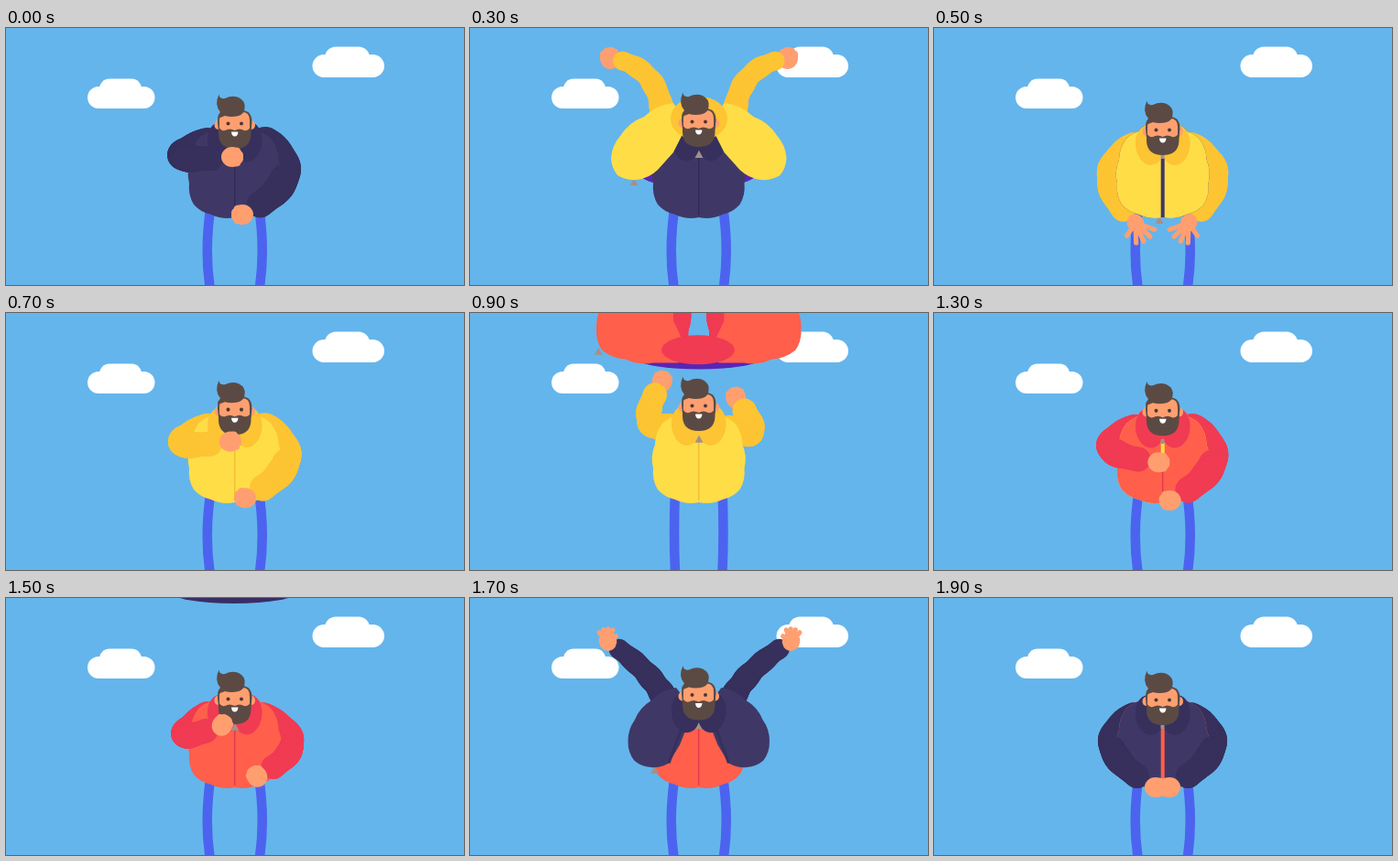
These frames come from a looping animation (500 px wide and 281 px high, 2000 ms). An HTML page with a canvas:

```html
<!DOCTYPE html>
<html lang="en">
<head>
<meta charset="utf-8">
<title>Jackets</title>
<style>
html, body { margin: 0; width: 100%; height: 100%; overflow: hidden; background: #64b5ec; }
canvas { display: block; width: 100vw; height: 100vh; }
</style>
</head>
<body>
<canvas id="stage" width="500" height="281"></canvas>
<script>
const ctx = document.getElementById('stage').getContext('2d');
const LOOP = 2000, STEP = 100, CHANGE = LOOP / 3;
const SKIN = '#ff9f70', HAIR = '#5b4a43', GREY = '#a58f8b';
const JACKETS = [
  { body: '#3f3866', sleeve: '#37305c', line: '#312b54', lining: '#3a2d66' },
  { body: '#ffdd47', sleeve: '#fdc433', line: '#f2bd34', lining: '#5a25b4' },
  { body: '#ff5f4b', sleeve: '#f03b53', line: '#e23a4c', lining: '#5a25b4' }
];

// Each row: time within one jacket change, then values.
const HEAD = [[0, -7], [167, -1], [233, -10], [300, -9], [433, -2], [500, 0], [567, 0], [667, -7]];
const BOW = [[0, 1], [167, 1], [233, .25], [300, 1], [667, 1]];
// shoulder, elbow, hand, shoulder radius, cuff radius
const ARM_L = [
  [0, 220, 126, 193, 141, 247, 141, 17, 13],
  [167, 220, 128, 195, 150, 236, 139, 15, 13],
  [233, 218, 124, 195, 116, 210, 75, 14, 13],
  [300, 210, 94, 193, 52, 153, 33, 13, 10],
  [433, 214, 124, 184, 104, 148, 61, 15, 11],
  [467, 214, 128, 166, 116, 114, 106, 15, 11],
  [500, 219, 130, 192, 165, 220, 213, 16, 13],
  [567, 219, 130, 195, 165, 242, 207, 16, 13],
  [667, 220, 126, 193, 141, 247, 141, 17, 13]
];
const ARM_R = [
  [0, 283, 126, 304, 164, 258, 204, 18, 14],
  [167, 280, 128, 312, 160, 274, 195, 14, 13],
  [233, 283, 126, 308, 129, 290, 93, 14, 13],
  [300, 289, 94, 306, 52, 347, 33, 13, 10],
  [433, 285, 124, 315, 104, 354, 61, 15, 11],
  [467, 285, 128, 333, 116, 384, 106, 15, 11],
  [500, 280, 130, 307, 165, 278, 213, 16, 13],
  [567, 280, 130, 304, 165, 257, 207, 16, 13],
  [667, 283, 126, 304, 164, 258, 204, 18, 14]
];
const EMPTY_SLEEVE = [
  [167, 222, -20, 229, -60, 236, -100, 14, 14],
  [233, 222, 35, 228, -5, 236, -45, 15, 14],
  [300, 210, 94, 193, 52, 153, 33, 13, 10]
];
// finger spread, pointing angle of the left hand
const FINGERS = [[0, 0, 0], [300, 0, -100], [367, .6, -100], [433, 1, -108], [467, 1, -175], [500, 1, -305], [567, 0, -360], [667, 0, -360]];
// left half of the jacket, outer edge first, then the opening
const HALF = [
  [167, 222, -76, 180, -81, 145, -66, 138, -38, 143, -15, 170, -5, 200, -4, 228, -4, 240, -14, 226, -45],
  [233, 222, -20, 180, -25, 145, -10, 138, 18, 144, 40, 170, 50, 200, 54, 228, 54, 238, 42, 222, 8],
  [300, 222, 82, 190, 97, 164, 118, 154, 142, 161, 161, 182, 166, 205, 155, 222, 136, 231, 118, 230, 95],
  [433, 228, 114, 206, 127, 196, 148, 191, 172, 197, 194, 212, 204, 229, 206, 236, 185, 243, 163, 250, 141],
  [500, 228, 112, 210, 121, 202, 144, 200, 170, 205, 193, 224, 204, 250, 207, 250, 186, 250, 164, 250, 138]
];
const COLLAR = [[167, 249, -15, 40, 16], [233, 249, 40, 40, 16], [300, 250, 99, 31, 24], [367, 250, 118, 31, 24]];
const LINING = [[167, 249, -7, 70, 13], [233, 250, 48, 70, 13], [300, 249, 158, 65, 17], [433, 250, 170, 40, 25]];
const PULL = [[167, 140, -15], [233, 140, 41], [300, 179, 168], [433, 224, 208], [500, 246, 210]];

const lerp = (a, b, k) => a + (b - a) * k;
const flipX = x => 499.5 - x;

function track(rows, time) {
  const next = rows.findIndex(row => row[0] > time);
  if (next < 0) return rows[rows.length - 1].slice(1);
  if (next === 0) return rows[0].slice(1);
  const a = rows[next - 1], b = rows[next];
  const k = (time - a[0]) / (b[0] - a[0]);
  return a.slice(1).map((v, i) => lerp(v, b[i + 1], k));
}

function oval(x, y, rx, ry, color, turn = 0) {
  ctx.fillStyle = color;
  ctx.beginPath();
  ctx.ellipse(x, y, rx, ry, turn, 0, 7);
  ctx.fill();
}

function shape(d, color) {
  ctx.fillStyle = color;
  ctx.fill(new Path2D(d));
}

function stroke(d, color, width) {
  ctx.strokeStyle = color;
  ctx.lineWidth = width;
  ctx.stroke(new Path2D(d));
}

function pill(x, y, w, h, r) {
  ctx.fillStyle = '#fff';
  ctx.beginPath();
  ctx.roundRect(x, y, w, h, r);
  ctx.fill();
}

function mirrored(draw) {
  draw();
  ctx.save();
  ctx.translate(499.5, 0);
  ctx.scale(-1, 1);
  draw();
  ctx.restore();
}

function scenery() {
  ctx.fillStyle = '#64b5ec';
  ctx.fillRect(0, 0, 500, 281);
  pill(89, 64, 73.5, 24, 12);
  pill(102, 55.5, 46, 26, 11);
  pill(334.5, 29, 78.5, 25, 12.5);
  pill(348, 20.5, 49, 27, 12);
}

function legs(bow) {
  const x = lerp(224, 216, bow), foot = lerp(224.5, 223, bow);
  mirrored(() => stroke(`M224 192Q${x} 242 ${foot} 286`, '#4c63f0', 10.5));
}

function sleeve([sx, sy, ex, ey, hx, hy, r0, r1], color, from = 0) {
  const cx = 2 * ex - (sx + hx) / 2, cy = 2 * ey - (sy + hy) / 2;
  for (let k = from; k <= .88; k += .02) {
    const x = lerp(lerp(sx, cx, k), lerp(cx, hx, k), k);
    const y = lerp(lerp(sy, cy, k), lerp(cy, hy, k), k);
    const r = lerp(r0, r1, k) + .6 * Math.sin(k * 22);
    oval(x, y, r, r, color);
  }
}

function hand(x, y, spread, angle, side) {
  ctx.save();
  ctx.translate(x, y);
  ctx.scale(side, 1);
  ctx.rotate(angle * Math.PI / 180);
  const r = lerp(11.5, 9.5, spread);
  oval(0, 0, r + .5, r - .5, SKIN);
  if (spread < .1) {
    for (const a of [-.9, -.3, .3, .9]) oval(8 * Math.cos(a), 8 * Math.sin(a), 4.2, 4, SKIN);
  } else {
    ctx.lineCap = 'round';
    for (const a of [-.62, -.2, .2, .58, 1.2]) {
      const len = (a > 1 ? 17 : 22) * spread;
      stroke(`M0 0L${len * Math.cos(a)} ${len * Math.sin(a)}`, SKIN, 5.2);
    }
    ctx.lineCap = 'butt';
  }
  ctx.restore();
}

// Padded panel: rounded puffs outside, straight edges along the opening.
function panel(v, color) {
  ctx.fillStyle = color;
  ctx.beginPath();
  ctx.moveTo(v[0], v[1]);
  for (let i = 2; i < v.length; i += 2) {
    const dx = v[i] - v[i - 2], dy = v[i + 1] - v[i - 1];
    const puff = i <= 12 ? .17 : 0;
    ctx.quadraticCurveTo(v[i] - dx / 2 - dy * puff, v[i + 1] - dy / 2 + dx * puff, v[i], v[i + 1]);
  }
  ctx.closePath();
  ctx.fill();
}

function lapels(dy, color) {
  mirrored(() => oval(235.5, 128 + dy, 15.5, 22, color, -.12));
}

function zipPull(x, y) {
  shape(`M${x} ${y - 4}l4.5 8h-9z`, GREY);
}

function wornJacket(jacket, dy) {
  const shut = track(HALF, CHANGE);
  mirrored(() => panel(shut, jacket.body));
  stroke('M249.7 138V205', jacket.line, 1.4);
  lapels(dy / 2, jacket.sleeve);
  zipPull(250, 141 + dy / 3);
}

function head(dy) {
  ctx.save();
  ctx.translate(0, dy);
  mirrored(() => {
    oval(231.5, 113, 4, 5, SKIN);
    shape('M231 110Q231 98 241 97L250 118L232 120Z', HAIR);
  });
  shape('M233 122V108Q233 99 240 99H258Q266 99 266 108V122Z', SKIN);
  shape('M232 114Q234 120 239 119Q244 116 249.7 119Q255 116 260 119Q265 120 267.5 114V123Q267 139 249.7 139Q232.5 139 232 123Z', HAIR);
  shape('M246 120.5H253.5Q253 125.5 249.7 125.5Q246.5 125.5 246 120.5Z', '#fff');
  oval(242.5, 111.5, 2, 2.1, '#493a38');
  oval(257, 111.5, 2, 2.1, '#493a38');
  shape('M232.5 79.5Q233 85 239 84Q247 80 254 83Q262 87 260.5 95Q260 101 254 103Q246 105 239 103L231 106Q231 102 234 99Q227 91 232.5 79.5Z', HAIR);
  ctx.restore();
}

function draw(time) {
  const turn = Math.floor(time / CHANGE), p = time - turn * CHANGE;
  const old = JACKETS[turn % 3], fresh = JACKETS[(turn + 1) % 3];
  const [dy] = track(HEAD, p), [spread, angle] = track(FINGERS, p);
  const left = track(ARM_L, p), right = track(ARM_R, p);
  const dressed = p > 290, arriving = p > 150;
  const armColor = (dressed ? fresh : old).sleeve;
  const half = track(HALF, p);

  const hands = () => {
    hand(left[4], left[5], spread, angle, 1);
    hand(right[4], right[5], spread, angle, -1);
  };
  const arms = from => {
    sleeve(left, armColor, from);
    sleeve(right, armColor, from);
  };

  scenery();
  legs(track(BOW, p)[0]);
  if (arriving && p < 430) oval(...track(LINING, p), fresh.lining);

  const tucked = p > 200 && p < 350;
  if (tucked) hands();
  arms(0);
  wornJacket(old, dy);

  if (arriving) {
    if (!dressed) {
      const empty = track(EMPTY_SLEEVE, p);
      mirrored(() => sleeve(empty, fresh.sleeve));
    }
    if (p < 510) zipPull(...track(PULL, p));
    mirrored(() => {
      panel(half, fresh.body);
      if (p > 330 && p < 490) {
        stroke(`M${half[12]} ${half[13]}L${half[18]} ${half[19]}`, fresh.sleeve, 3);
      }
    });
    if (p >= 490) {
      stroke('M249.7 138V206', fresh.line, 1.4);
      ctx.fillStyle = old.body;
      ctx.fillRect(247.7, 142, 4, Math.max(0, Math.min(207, left[5]) - 142));
    }
    if (p < 350) oval(...track(COLLAR, p), fresh.sleeve);
    else lapels(dy / 2, fresh.sleeve);
    if (p >= 490) {
      ctx.fillStyle = GREY;
      ctx.fillRect(247.5, 138, 4, 5);
    }
    if (p > 280 && p < 350) {
      lapels(dy / 2 + 4, 'transparent');
    }
  }

  head(dy);
  if (p < 200 || p > 540) arms(.5);
  if (!tucked) hands();
}

const start = performance.now();
function tick() {
  const elapsed = Math.max(0, performance.now() - start);
  draw(Math.floor((elapsed % LOOP) / STEP) * STEP);
  requestAnimationFrame(tick);
}
tick();
</script>
</body>
</html>
```
